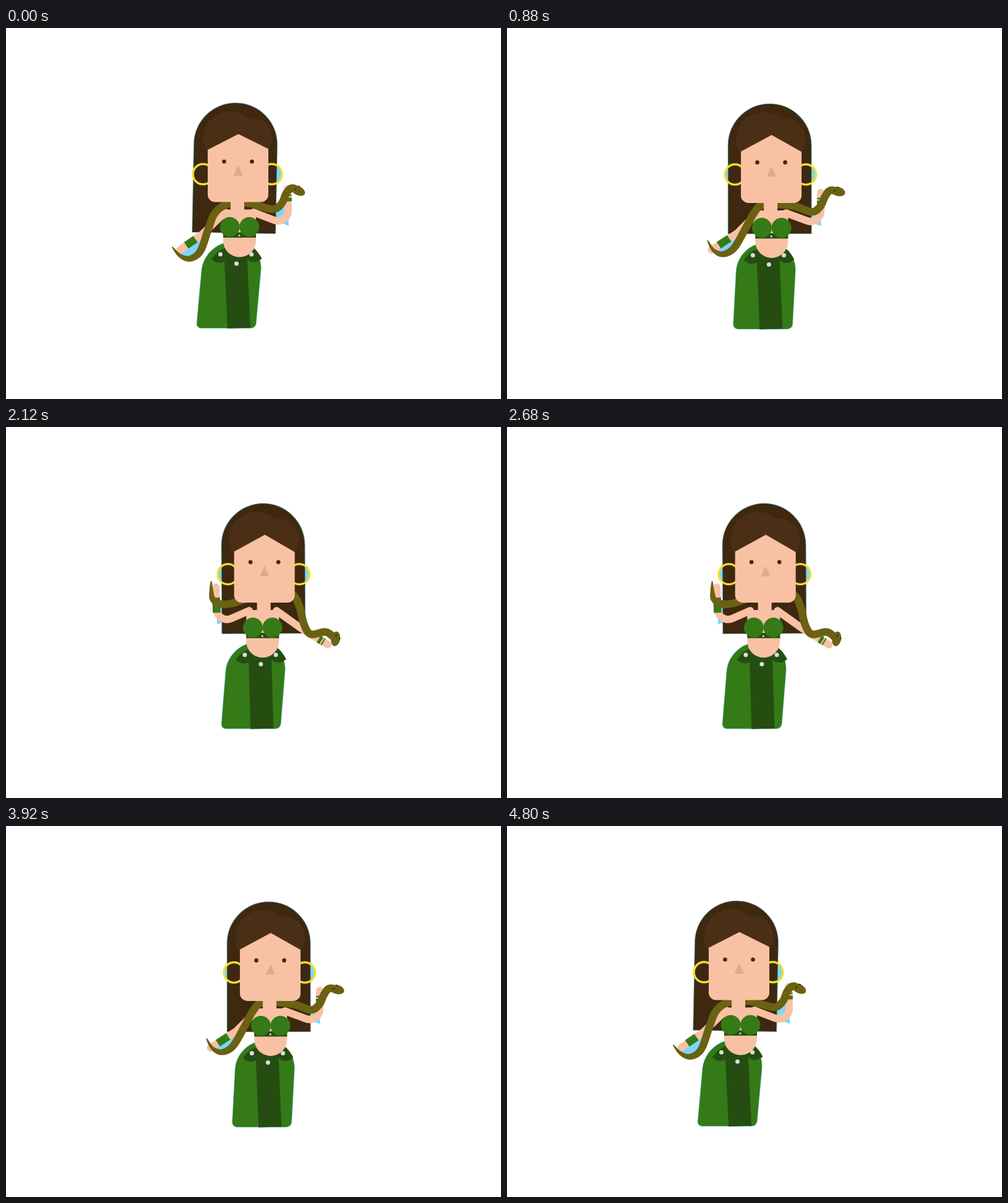
Recreate the animation shown at these times as an HTML page with a canvas. Size 800 by 600 pixels, loop 4840 ms.

```html
<!DOCTYPE html>
<html lang="en">
<head>
<meta charset="utf-8">
<title>Snake dancer</title>
<style>
  html, body { margin: 0; width: 100%; height: 100%; overflow: hidden; background: #fff; }
  canvas { display: block; }
</style>
</head>
<body>
<canvas id="stage" width="800" height="600"></canvas>
<script>
const ctx = document.getElementById('stage').getContext('2d');

const SKIN = '#f9c1a4', HAIR = '#3f2810', FRINGE = '#4a2f16', NOSE = '#dfaa8c';
const GREEN = '#347a16', DARK = '#254d12', SNAKE = '#6b6113', GOLD = '#f6de2c';
const SKY = '#7ad7fb', STONE = '#dcdcdc', EDGE = 'rgba(70, 195, 215, .55)';

const STEP = 40, LOOP = 4840, TURN = 2400, BEAT = 800, BOB = 400;

// Horizontal place of each body part on the four beats.
const KEYS = {
  face: [375, 428.2, 381.6, 431.2],
  torso: [377.5, 429, 378.2, 428.5],
  belt: [371.5, 423.3, 385, 420.6],
  hip: [364, 419, 385.7, 409.5],
  hem: [356, 414.2, 386.5, 399.5],
  tilt: [1, 0, -1, 0]
};

// Pose: 14 snake points, left arm (3), right arm (3), x relative to the torso; then head angle.
const LOW_LEFT = [
  -109, 354, -96.5, 368, -80.5, 373, -63.5, 361, -50.5, 325, -39.5, 299, -19.5, 285,
  12.5, 283, 32.5, 288, 55.5, 293, 68.5, 283, 75.5, 267, 84.5, 259, 94.5, 263,
  -23.5, 298, -59.5, 333, -96.5, 359, 22.5, 298, 79.5, 320, 77.5, 260, 27];
const LOW_RIGHT = [
  -103.7, 343.7, -93, 360, -78, 365.7, -60, 355, -42, 322, -30, 299, -16, 284,
  14, 283, 40, 286, 66, 292.5, 79, 282.5, 85, 267, 93, 257, 106, 258,
  -23, 297.7, -57, 328.6, -97, 359.7, 23, 297.7, 81, 318.6, 78, 261.6, 12];
const PASSING = [
  -96.7, 286, -95.5, 302, -86.5, 315, -71.5, 319, -45.5, 306, -27.5, 293.5, -11.5, 285,
  18, 283, 39.5, 294.5, 56, 323, 69.5, 340, 89.5, 340, 107.5, 330, 119.3, 340.6,
  -20.7, 297.7, -46.7, 338.6, -89.7, 294.7, 22, 297.7, 59.3, 322.6, 100.3, 328.6, 62];
const HIGH = [
  -83.2, 246.5, -83, 261.5, -80.7, 275.5, -68.7, 283.5, -51.7, 283, -35, 278, -15, 272,
  25, 262, 48.5, 268.5, 59.5, 288.5, 66.5, 316.5, 77.5, 332.5, 101.5, 329, 117.3, 340,
  -21.7, 294.5, -73.7, 317, -75.7, 256.5, 22.3, 294.5, 61, 322.5, 105, 349.5, 100];

const ease = u => (1 - Math.cos(Math.PI * u)) / 2;
const mix = (a, b, u) => a + (b - a) * u;
const reach = (pose, k) => pose.map((v, i) => i % 2 === 0 && i < 40 && v > 0 ? v * k : v);
const HIGH_LEFT = reach(HIGH, .967), HIGH_RIGHT = reach(HIGH, 1.02);
const PASS_AT = ease(.6);

function blendPose(beat, e) {
  if (beat === 0) return LOW_LEFT.map((v, i) => mix(v, LOW_RIGHT[i], e));
  if (beat === 2) return HIGH_LEFT.map((v, i) => mix(v, HIGH_RIGHT[i], e));
  const m = PASS_AT;
  const a = (e - m) * (e - 1) / m, b = e * (e - 1) / (m * (m - 1)), c = e * (e - m) / (1 - m);
  return LOW_RIGHT.map((v, i) => a * v + b * PASSING[i] + c * HIGH_LEFT[i]);
}

function shape(color, build) {
  ctx.beginPath();
  build();
  ctx.fillStyle = color;
  ctx.fill();
}
const disc = (x, y, r, color) => shape(color, () => ctx.arc(x, y, r, 0, 7));
const poly = (points, color) => shape(color, () => {
  points.forEach(p => ctx.lineTo(p[0], p[1]));
  ctx.closePath();
});
const box = (x, y, w, h, r, color) => shape(color, () => ctx.roundRect(x, y, w, h, r));

function line(color, width, cap, build) {
  ctx.beginPath();
  build();
  ctx.strokeStyle = color;
  ctx.lineWidth = width;
  ctx.lineCap = cap;
  ctx.stroke();
}

function outline() {
  ctx.strokeStyle = EDGE;
  ctx.lineWidth = 1;
  ctx.stroke();
}

function drawHair(face, tilt) {
  ctx.save();
  ctx.translate(face - 2.5 - 1.5 * tilt, 188.5);
  ctx.rotate(tilt * 1.1 * Math.PI / 180);
  box(-67.5, -67.5, 135, 210.5, [67.5, 67.5, 0, 0], HAIR);
  outline();
  ctx.restore();
  disc(face - 12.5, 179, 44, FRINGE);
  disc(face + 22, 178.5, 33.5, FRINGE);
}

function drawArm([shoulder, elbow, hand]) {
  line(SKIN, 12, 'round', () => {
    ctx.moveTo(...shoulder);
    ctx.arcTo(...elbow, ...hand, 17);
    ctx.lineTo(...hand);
  });
}

function drawBand([, elbow, hand], from, to) {
  const at = u => [mix(elbow[0], hand[0], u), mix(elbow[1], hand[1], u)];
  line(GREEN, 12.5, 'butt', () => {
    ctx.moveTo(...at(from));
    ctx.lineTo(...at(to));
  });
}

function spline(p0, p1, p2, p3, u) {
  return [0, 1].map(k => p1[k] + .5 * u * (p2[k] - p0[k] + u * (2 * p0[k] - 5 * p1[k] + 4 * p2[k] - p3[k]
    + u * (3 * (p1[k] - p2[k]) + p3[k] - p0[k]))));
}

function drawSnake(spine, angle) {
  const path = [], last = spine.length - 1;
  for (let i = 0; i < last; i++) {
    for (let j = 0; j < 10; j++) {
      path.push(spline(spine[Math.max(i - 1, 0)], spine[i], spine[i + 1], spine[Math.min(i + 2, last)], j / 10));
    }
  }
  const left = [], right = [];
  path.forEach((p, i) => {
    const a = path[Math.max(i - 1, 0)], b = path[Math.min(i + 1, path.length - 1)];
    const dx = b[0] - a[0], dy = b[1] - a[1];
    const w = 6.2 * Math.sin(Math.min(1, (i / 10 + .3) / 4) * Math.PI / 2) / (Math.hypot(dx, dy) || 1);
    left.push([p[0] - dy * w, p[1] + dx * w]);
    right.unshift([p[0] + dy * w, p[1] - dx * w]);
  });
  poly(left.concat(right), SNAKE);

  ctx.save();
  ctx.translate(...spine[last]);
  ctx.rotate(angle * Math.PI / 180);
  shape(SNAKE, () => ctx.ellipse(0, 0, 12, 7.3, 0, 0, 7));
  disc(-5, 0, 1.4, '#2c2a10');
  disc(-1.7, -6.6, 1.2, '#2c2a10');
  ctx.restore();
}

function drawSkirt(hip, hem, belt, torso) {
  const skew = (hip - hem) / (392 - 480);
  ctx.save();
  ctx.transform(1, 0, skew, 1, hem - skew * 480, 0);
  box(-48, 345.5, 96, 140, [47, 47, 8, 8], GREEN);
  outline();
  ctx.restore();
  poly([[belt - 19, 365], [belt + 18, 365], [torso + 17.5, 484.8], [torso - 19.5, 486]], DARK);
  shape(DARK, () => {
    ctx.moveTo(belt - 18, 356);
    ctx.quadraticCurveTo(belt - 31, 361, belt - 39.5, 374);
    ctx.quadraticCurveTo(belt - 27, 385, belt - 15, 375);
    ctx.lineTo(belt + 17, 373);
    ctx.quadraticCurveTo(belt + 29, 384, belt + 42, 373);
    ctx.quadraticCurveTo(belt + 35, 360, belt + 28, 355);
  });
}

function drawTorso(x) {
  box(x - 26.5, 293.5, 53, 77, [8, 8, 26.5, 26.5], SKIN);
  box(x - 26.5, 330.5, 53, 8.5, 0, DARK);
  disc(x - 15.8, 321.7, 16, GREEN);
  disc(x + 15.8, 321.7, 16, GREEN);
  disc(x - .5, 335.5, 1.6, STONE);
}

function drawFace(x, tilt) {
  box(x - 12, 276, 22, 19, 0, SKIN);
  box(x - 49, 215, 98, 66.5, [0, 0, 12, 12], SKIN);
  poly([[x - 49, 216], [x - 49, 198.4 - 1.5 * tilt], [x + .7, 171.6], [x + 49, 198.8 - 3.4 * tilt], [x + 49, 216]], SKIN);
  disc(x - 22.5, 216, 3.3, HAIR);
  disc(x + 22.5, 216, 3.3, HAIR);
  poly([[x + .3, 222], [x - 7.3, 239], [x + 7.8, 239]], NOSE);
}

function draw(time) {
  const t = Math.floor(time % LOOP / STEP) * STEP;
  const s = t > TURN ? 2 * TURN - t : t;
  const beat = Math.min(2, Math.floor(s / BEAT));
  const e = ease(s / BEAT - beat);
  const at = name => mix(KEYS[name][beat], KEYS[name][beat + 1], e);
  const face = at('face'), torso = at('torso'), belt = at('belt'), tilt = at('tilt');
  const pose = blendPose(beat, e);
  const points = [];
  for (let i = 0; i < 40; i += 2) points.push([torso + pose[i], pose[i + 1]]);
  const spine = points.slice(0, 14), armL = points.slice(14, 17), armR = points.slice(17);
  const rings = [face - 58.5 + 2 * tilt, face + 56 - 1.5 * tilt], ringY = 235.6 + .8 * tilt;

  ctx.fillStyle = '#fff';
  ctx.fillRect(0, 0, 800, 600);
  ctx.save();
  ctx.translate(0, 4 * ease(s / BOB * 2));

  // Sky showing through the closed gaps
  poly([...spine.slice(1, 7), ...armL], SKY);
  poly([...spine.slice(8, 12), ...[...armR].reverse()], SKY);
  rings.forEach(x => disc(x, ringY, 16, SKY));

  drawHair(face, tilt);
  rings.forEach(x => line(GOLD, 3.4, 'butt', () => ctx.arc(x, ringY, 16.4, 0, 7)));
  drawArm(armL);
  drawArm(armR);
  drawBand(armL, .32, .72);
  drawBand(armR, .66, .76);
  drawBand(armR, .8, .84);
  drawSkirt(at('hip'), at('hem'), belt, torso);
  drawTorso(torso);
  drawSnake(spine, pose[40]);
  disc(belt - 25, 366, 3.5, STONE);
  disc(belt + 25.2, 366, 3.5, STONE);
  disc(belt + 1, 381, 3.5, STONE);
  drawFace(face, tilt);
  ctx.restore();
}

const start = performance.now();
function tick() {
  draw(performance.now() - start);
  requestAnimationFrame(tick);
}
tick();
</script>
</body>
</html>
```
